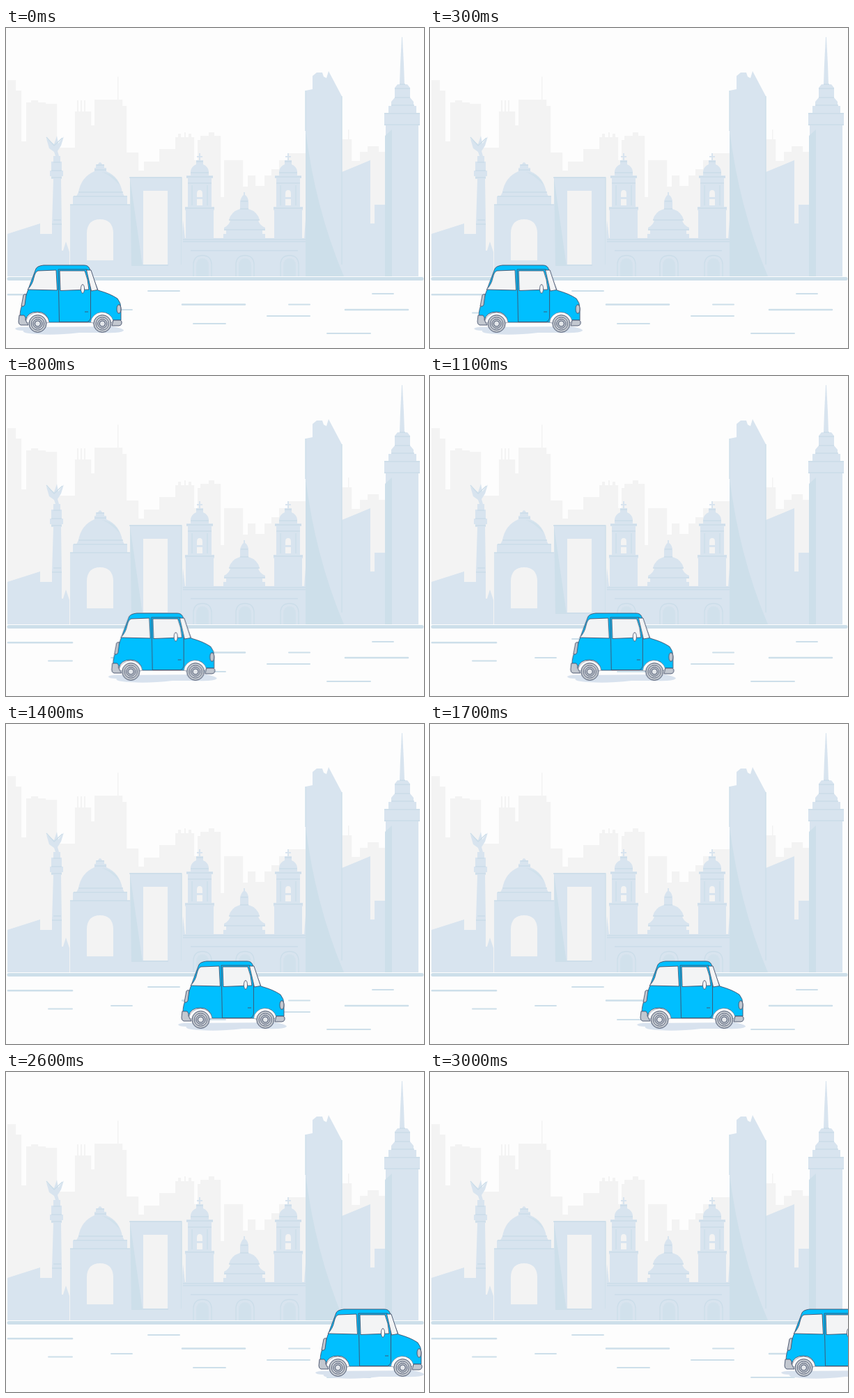
Animation, 600 px wide and 460 px high, one loop 3.1 s. Source, as an HTML page:

```html
<!DOCTYPE html>
<html lang="en">
<head>
<meta charset="utf-8">
<title>Car in the city</title>
<style>
  html, body { margin: 0; width: 100%; height: 100%; overflow: hidden; background: #fdfdfd; }
  svg { display: block; width: 600px; height: 460px; }
  .far { fill: #f3f3f3; }
  .city { fill: #d8e4ef; }
  .shade { fill: #cddfea; }
  .trim { fill: none; stroke: #cbdde9; stroke-width: 1.3; }
  .road { fill: none; stroke: #cddfea; stroke-linecap: round; }
  .line { stroke: #43506a; stroke-width: .9; stroke-linejoin: round; }
  .glass { fill: #f3f4f5; }
  .metal { fill: #c3c8d0; }
  .paint { fill: #00bfff; }
</style>
</head>
<body>
<svg viewBox="0 0 600 460">
  <defs>
    <g id="belfry">
      <g class="city">
        <rect x="-20" y="262" width="40" height="41"/>
        <rect x="-21" y="257" width="42" height="5"/>
        <rect x="-17" y="216" width="34" height="41"/>
        <rect x="-19" y="212" width="38" height="4"/>
        <path d="M -13 212 V 206 Q -12 199 -5 196 V 190 H 5 V 196 Q 12 199 13 206 V 212 Z"/>
        <rect x="-1" y="180" width="2" height="10"/>
        <rect x="-4" y="184" width="8" height="2"/>
      </g>
      <path class="far" d="M -4 255 V 238 Q -4 233 0 233 T 4 238 V 255 Z"/>
      <rect class="city" x="-4" y="243" width="8" height="3"/>
      <path class="trim" d="M -19 214 H 19 M -21 259 H 21 M -17 223 H 17"/>
      <path class="trim" d="M -11 226 V 255 M 11 226 V 255 M -13 208 H 13 M -5 192 H 5"/>
    </g>
    <g id="arch">
      <path class="trim" d="M -13 357 V 339 Q -12 327 0 327 T 13 339 V 357"/>
      <path class="shade" opacity=".6" d="M -9 357 V 341 Q -8 331 0 331 T 9 341 V 357 Z"/>
    </g>
    <g id="wheel" class="line">
      <circle r="12.5" fill="#bfc4cb"/>
      <circle r="9" fill="#eceef0"/>
      <circle r="6.8" fill="#b4bac3"/>
      <circle r="4" fill="#e3e6ea"/>
    </g>
  </defs>

  <g id="far" class="far"></g>

  <!-- column and low roofs -->
  <g class="city">
    <path d="M 2 357 V 296 L 49 281 V 296 H 66 V 357 Z"/>
    <path d="M 66 357 V 282 L 68 217 H 79 L 80 282 V 357 Z"/>
    <path d="M 80 357 V 320 L 82 320 L 86 307 L 91 322 V 357 Z"/>
    <rect x="63" y="205" width="19" height="8"/>
    <rect x="65" y="192" width="15" height="25"/>
    <rect x="68" y="184" width="10" height="8"/>
    <path d="M 71 184 L 69 178 L 62 173 L 58 159 L 69 167 L 73 155 L 75 166 L 83 156 L 79 169 L 74 177 L 76 184 Z"/>
  </g>
  <path class="trim" d="M 65 205 H 80 M 65 215 H 80 M 66 282 H 80 M 68 193 H 78 M 68 276 H 79"/>
  <path class="trim" d="M 58 157 L 69 169 L 81 158"/>

  <!-- domed arch -->
  <g class="city">
    <path d="M 92 357 V 254 H 178 V 357 H 154 V 294 Q 153 275 135 275 T 116 294 V 357 Z"/>
    <rect x="116" y="334" width="38" height="23"/>
    <path d="M 96 254 V 242 H 101 L 104 236 Q 108 214 127 206 H 144 Q 163 214 167 236 L 170 242 H 174 V 254 Z"/>
    <path d="M 127 206 V 201 H 129 V 196 H 132 Q 135 190 138 196 H 141 V 201 H 144 V 206 Z"/>
  </g>
  <path class="trim" d="M 92 254 H 178 M 97 242 H 174 M 104 236 H 168 M 127 204 H 144 M 130 197 H 141"/>
  <path class="shade" opacity=".7" d="M 138 207 Q 157 210 163 226 Q 151 212 138 207 Z"/>

  <!-- square gate -->
  <path class="city" d="M 178 357 V 214 H 252 V 357 Z"/>
  <rect class="far" x="197" y="234" width="35" height="106"/>
  <path class="shade" d="M 178 216 L 196 342 H 180 Z"/>
  <path class="trim" d="M 177 215 H 252 V 340 M 196 341 H 233"/>

  <!-- cathedral -->
  <g class="city">
    <path d="M 252 357 V 312 L 254 276 L 257 302 H 428 L 430 275 V 357 Z"/>
    <rect x="312" y="296" width="60" height="6"/>
    <path d="M 316 296 V 291 H 313 V 287 Q 321 283 322 276 H 362 Q 363 283 372 287 V 291 H 368 V 296 Z"/>
    <path d="M 320 276 Q 323 264 336 260 H 348 Q 361 264 364 276 Z"/>
    <path d="M 336 260 V 249 Q 338 242 341 240 V 236 H 343 V 240 Q 347 242 348 249 V 260 Z"/>
  </g>
  <use href="#belfry" x="278"/>
  <use href="#belfry" x="405"/>
  <path class="trim" d="M 254 304 H 430 M 254 307 H 430 M 265 320 H 419"/>
  <path class="trim" d="M 313 290 H 372 M 320 276 H 364 M 336 260 H 348 M 337 249 H 347"/>
  <use href="#arch" x="282"/>
  <use href="#arch" x="343"/>
  <use href="#arch" x="407"/>

  <!-- towers -->
  <g class="city">
    <path d="M 430 357 V 90 L 440 88 V 69 L 446 64 H 454 L 456 70 L 460 72 L 463 62 L 482 98 V 357 Z"/>
    <path d="M 482 357 V 207 L 523 190 V 281 H 529 V 254 H 545 V 357 Z"/>
    <rect x="545" y="140" width="47" height="217"/>
    <rect x="543" y="122" width="51" height="18"/>
    <path d="M 549 122 V 112 H 553 V 106 L 558 100 H 580 L 585 106 V 112 H 589 V 122 Z"/>
    <path d="M 558 100 V 86 L 562 81 H 576 L 580 86 V 100 Z"/>
    <path d="M 565 81 L 566 52 L 568 13 H 569 L 571 52 L 572 81 Z"/>
  </g>
  <path class="shade" d="M 430 147 Q 444 260 485 357 H 430 Z"/>
  <path class="shade" d="M 544 155 L 554 146 V 357 H 544 Z"/>
  <path class="trim" d="M 482 98 V 340 M 430 90 V 148 M 543 123 H 594 M 543 139 H 594"/>
  <path class="trim" d="M 553 111 H 586 M 558 100 H 580 M 558 87 H 580 M 565 81 H 573"/>

  <path class="road" stroke-width="5" d="M 4 360.5 H 597"/>
  <g id="road" class="road"></g>

  <g id="car">
    <path fill="#d8e2ee" d="M 13 432 Q 17 429 35 430 L 153 429 Q 169 432 169 435 Q 164 439 140 438 L 105 438 Q 70 442 45 440 Q 22 439 25 435 Q 14 435 13 432 Z"/>
    <g class="line">
      <path class="paint" d="M 43 346 Q 45 342 54 341 H 112 Q 118 341 120 346 L 132 377 Q 150 382 160 389 Q 165 395 165 403 V 420 H 153 Q 150 409 138 409 T 122 423 H 62 Q 59 408 45 408 T 28 420 L 20 416 Q 20 402 25 395 Q 34 369 43 346 Z"/>
      <path class="glass" d="M 46 349 L 72 348 L 73.5 377 L 31 376 Q 38 369 40 359 Q 42 350 46 349 Z"/>
      <path class="paint" d="M 75 347 H 116 Q 121 360 121.5 378 V 417 Q 121 421 117 422.5 H 76.5 Z"/>
      <path class="glass" d="M 77 349 H 113 Q 118 361 119 376 L 78 377.5 Z"/>
      <path class="glass" d="M 115.5 348 H 122 L 131.5 376.5 L 122.5 378 Z"/>
      <path class="metal" d="M 25 384 Q 26 382 29 383 L 27 398 Q 26 401 22 400 Z"/>
      <g fill="#fff" stroke-width=".5">
        <path d="M 28.5 422 A 17 16 0 0 1 62 423 L 58 424 H 32 Z"/>
        <path d="M 121.5 423 A 16.5 16 0 0 1 154 421 L 151 424 H 125 Z"/>
      </g>
      <path class="metal" d="M 19 413 H 26 Q 29 416 28 420 L 32 427 H 21 Q 18 426 18 422 Z"/>
      <path class="metal" d="M 154 420 H 164 Q 167 421 166 425 Q 165 428 162 428 H 152 Z"/>
      <ellipse class="metal" cx="162" cy="404" rx="3" ry="6.3"/>
      <ellipse fill="#fff" cx="110" cy="375" rx="2.5" ry="6.3"/>
      <path d="M 113 408 H 118"/>
    </g>
    <use href="#wheel" x="45.5" y="425"/>
    <use href="#wheel" x="138.3" y="425"/>
  </g>
</svg>
<script>
  const byId = id => document.getElementById(id);

  function add(parent, tag, attrs) {
    const node = document.createElementNS('http://www.w3.org/2000/svg', tag);
    for (const key in attrs) node.setAttribute(key, attrs[key]);
    parent.append(node);
  }

  // Distant roofs: left edge and top, each reaching to the next edge
  const west = [
    [2, 75], [14, 90], [22, 163], [29, 107], [36, 104], [46, 107], [57, 109],
    [73, 172], [99, 120], [122, 140], [127, 103], [167, 112], [173, 179],
    [190, 205], [198, 192], [220, 174], [243, 157], [270, 190], [275, 161],
    [279, 155], [308, 243], [313, 190], [340, 228], [347, 212], [358, 227],
    [371, 212], [381, 203], [392, 190], [405, 180], [430, 357]
  ];
  const east = [[482, 160], [496, 191], [508, 178], [519, 170], [535, 178], [545, 357]];

  // Masts and roof boxes: left, top, width, height
  const masts = [
    [102, 104, 2, 18], [107, 104, 2, 18], [112, 104, 2, 18], [160, 70, 1.5, 35],
    [247, 152, 4, 6], [256, 150, 2, 8], [262, 152, 4, 6], [291, 150, 8, 6],
    [491, 146, 1.5, 15]
  ];

  const block = ([x, y, width, height]) => add(byId('far'), 'rect', { x, y, width, height });

  for (const roofs of [west, east]) {
    roofs.slice(1).forEach(([end], i) => {
      const [x, top] = roofs[i];
      block([x, top, end - x + .2, 357 - top]);
    });
  }
  masts.forEach(block);

  // Road marks: left, right, height, weight
  const marks = [
    [3, 95, 383.3, 2.5], [253, 343, 397.5, 2.5], [487, 577, 405, 2.5],
    [204, 249, 378, 1.9], [61, 95, 409.5, 1.9], [151, 181, 405, 1.9],
    [269, 315, 425, 1.9], [375, 436, 414, 1.9], [406, 436, 397.5, 1.9],
    [526, 556, 382, 1.9], [461, 523, 439, 1.9]
  ];
  for (const [x1, x2, y, weight] of marks) {
    add(byId('road'), 'line', { x1, x2, y1: y, y2: y, 'stroke-width': weight });
  }

  // ms, x, moves until the next row
  const drive = [[0, 0, 24], [2400, 401, 7], [3100, 506, 1]];
  const loop = 3100;

  byId('car').animate(
    drive.map(([ms, x, moves]) => ({
      offset: ms / loop,
      transform: `translateX(${x}px)`,
      easing: `steps(${moves}, end)`
    })),
    { duration: loop, iterations: Infinity }
  );
</script>
</body>
</html>
```
